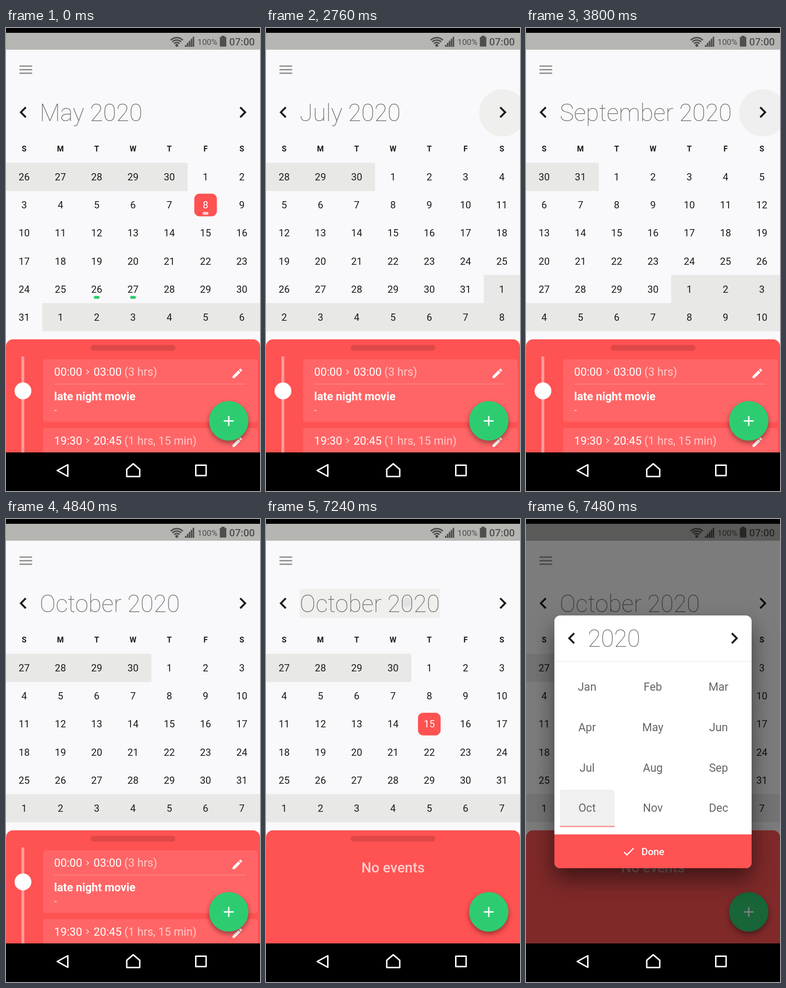
Animation, 528 px wide and 960 px high, one loop 8000 ms. Source, as an HTML page with a canvas:

```html
<!DOCTYPE html>
<html lang="en">
<head>
<meta charset="utf-8">
<title>Calendar</title>
<style>
  html, body { margin: 0; width: 100%; height: 100%; overflow: hidden; background: #000; }
  canvas { display: block; }
</style>
</head>
<body>
<canvas id="stage" width="528" height="960"></canvas>
<script>
const ctx = document.getElementById('stage').getContext('2d');
const LOOP = 8000, COL = 528 / 7, ROW = 58.13, GRID_TOP = 279.5, NAV_TOP = 880, TITLE_SIZE = 49.87;
const PAPER = '#f9f9fb', RED = '#ff5252', GREEN = '#2ecc71', INK = '#1c1c1c', WHITE = '#fff',
      PINK = '#ffcbcb', PRESSED = '#efefee', OUTSIDE = '#e8e8e7', MUTED = '#666';

// 24-unit icons
const ICON = {
  left: new Path2D('M15.41 7.41L14 6l-6 6 6 6 1.41-1.41L10.83 12z'),
  right: new Path2D('M10 6L8.59 7.41 13.17 12l-4.58 4.59L10 18l6-6z'),
  pencil: new Path2D('M3 17.25V21h3.75L17.81 9.94l-3.75-3.75zM20.71 7.04a1 1 0 0 0 0-1.41l-2.34-2.34a1 1 0 0 0-1.41 0l-1.83 1.83 3.75 3.75z'),
  check: new Path2D('M9 16.17L4.83 12l-1.42 1.41L9 19 21 7l-1.41-1.41z'),
};

// Each press highlights from start to end and takes effect on release
const tap = (start, end, day) => ({ start, end, day, release: Math.max(start + 40, end - 240) });
const nextTaps = [tap(2160, 2440), tap(2680, 2960), tap(3240, 3600), tap(3760, 4000), tap(4200, 4600)];
const dayTaps = [tap(5120, 5360, 14), tap(6000, 6800, 15)];
const titleTap = tap(7040, 7440);

const clamp = v => Math.max(0, Math.min(1, v));
const press = (t, { start, end }) => clamp(Math.min((t - start + 30) / 80, (end - t) / 160));

function box(x, y, w, h, color, radius = 0) {
  ctx.fillStyle = color;
  ctx.beginPath();
  ctx.roundRect(x, y, w, h, radius);
  ctx.fill();
}

function disc(x, y, r, color) {
  ctx.fillStyle = color;
  ctx.beginPath();
  ctx.arc(x, y, r, 0, 2 * Math.PI);
  ctx.fill();
}

function text(str, x, y, size, color, weight = 400, align = 'left') {
  ctx.font = `${weight} ${size}px Roboto, sans-serif`;
  ctx.textAlign = align;
  ctx.fillStyle = color;
  ctx.fillText(str, x, y);
}

function icon(name, x, y, scale, color) {
  ctx.save();
  ctx.translate(x, y);
  ctx.scale(scale, scale);
  ctx.fillStyle = color;
  ctx.fill(ICON[name]);
  ctx.restore();
}

function withAlpha(alpha, draw) {
  if (alpha <= 0) return;
  ctx.save();
  ctx.globalAlpha = alpha;
  draw();
  ctx.restore();
}

function withShadow(color, blur, offset, draw) {
  ctx.save();
  Object.assign(ctx, { shadowColor: color, shadowBlur: blur, shadowOffsetY: offset });
  draw();
  ctx.restore();
}

function outline(d, color, width) {
  ctx.strokeStyle = color;
  ctx.lineWidth = width;
  ctx.lineJoin = 'round';
  ctx.stroke(new Path2D(d));
}

function statusBar() {
  const ink = '#4e4e4c';
  box(0, 10, 528, 35, '#b5b5b2');
  ctx.strokeStyle = ink;
  ctx.lineWidth = 3;
  for (const r of [8, 13, 18]) {
    ctx.beginPath();
    ctx.arc(355, 38, r, -Math.PI * 0.75, -Math.PI * 0.25);
    ctx.stroke();
  }
  disc(355, 36, 3, ink);
  for (let i = 0; i < 5; i++) box(372 + i * 4, 35 - i * 4.2, 3.2, 4 + i * 4.2, ink);
  text('100%', 398, 34.5, 17.2, ink);
  box(444.5, 18.5, 13.5, 20, ink, 1);
  box(448, 16, 6.5, 3, ink);
  text('07:00', 464, 36, 21, ink, 500);
}

function navBar() {
  box(0, NAV_TOP, 528, 80, '#000');
  outline('M106.5 917.5L128.5 905.5V929.5Z', WHITE, 3);
  outline('M251 930V915L264.5 903.5L278 915V930Z', WHITE, 3);
  outline('M394.5 906.5H416V928H394.5Z', WHITE, 3);
}

function header(t, month) {
  for (const y of [79, 86.4, 93.8]) box(28, y - 1.4, 26.4, 2.8, '#8f8f8f');

  for (const next of nextTaps)
    withAlpha(press(t, next), () => disc(492, 176, 49, PRESSED));

  const name = new Date(2020, month, 1).toLocaleString('en-US', { month: 'long' });
  const title = name + ' 2020';
  withAlpha(press(t, titleTap), () => {
    ctx.font = `100 ${TITLE_SIZE}px Roboto, sans-serif`;
    box(70, 145, ctx.measureText(title).width, 60, PRESSED);
    disc(293, 173, 10 * clamp((t - 7160) / 80), '#e2e2e2');
  });
  text(title, 70, 192.5, TITLE_SIZE, MUTED, 100);

  icon('left', 12.4, 151.2, 1.955, INK);
  icon('right', 468.7, 151.2, 1.955, INK);
  [...'SMTWTFS'].forEach((d, i) => text(d, (i + 0.5) * COL, 256, 16.1, INK, 700, 'center'));
}

function monthGrid(t, month, selected) {
  const offset = new Date(2020, month, 1).getDay();
  for (let i = 0; i < 42; i++) {
    const date = new Date(2020, month, 1 - offset + i), day = date.getDate();
    const inMonth = date.getMonth() === month;
    const x = i % 7 * COL, y = GRID_TOP + Math.floor(i / 7) * ROW;
    const cx = x + COL / 2, cy = y + ROW / 2 + 0.3;
    const isSelected = inMonth && day === selected;

    if (!inMonth) box(x, y, COL + 0.4, ROW + 0.4, OUTSIDE);
    if (inMonth && month === 9) {
      for (const pressed of dayTaps)
        if (pressed.day === day)
          withAlpha(press(t, pressed), () => box(x, y, COL, ROW, PRESSED));
    }
    if (isSelected) box(cx - 23.5, cy - 23.5, 47, 47, RED, 11);
    if (inMonth && month === 4 && [8, 26, 27].includes(day))
      box(cx - 6, cy + 14.2, 12, 6, isSelected ? PINK : GREEN, 3);
    text(day, cx, cy + 7.3, 20.5, isSelected ? WHITE : INK, 400, 'center');
  }
}

function eventCard(y, from, to, duration, name) {
  box(77, y, 446, 130, '#ff6566', 5);
  text(from, 100, y + 34, 23.47, WHITE);
  outline(`M167 ${y + 21.5}l5 4.5l-5 4.5`, PINK, 1.8);
  text(to, 182, y + 34, 23.47, WHITE);
  text(duration, 246, y + 34, 23.47, PINK);
  icon('pencil', 467.7, y + 16, 1.1, WHITE);
  box(100, y + 50.5, 398, 1.5, '#ff8686');
  text(name, 100, y + 85, 23.47, WHITE, 700);
  text('-', 100, y + 112, 20.5, '#ffe0e0');
}

function sheet(hasEvents) {
  box(0, 645.5, 528, 240, RED, [14.67, 14.67, 0, 0]);
  box(176, 657, 176, 12, '#e04848', 6);
  if (hasEvents) {
    box(32, 681, 6, 200, '#ff9a9a');
    disc(35.3, 752.5, 17.5, WHITE);
    eventCard(687, '00:00', '03:00', '(3 hrs)', 'late night movie');
    eventCard(829.5, '19:30', '20:45', '(1 hrs, 15 min)', '');
  } else {
    text('No events', 264, 732.5, 29.33, PINK, 500, 'center');
  }
  withShadow('rgba(0,0,0,.4)', 11, 5, () => disc(463, 814.5, 41, GREEN));
  box(452.7, 813.3, 20.6, 2.9, WHITE);
  box(461.6, 804.4, 2.9, 20.6, WHITE);
}

function monthPicker() {
  box(0, 10, 528, 870, 'rgba(0,0,0,.5)');
  withShadow('rgba(0,0,0,.5)', 45, 22, () => box(59, 200, 410, 524, WHITE, 12));
  icon('left', 71.4, 223.8, 1.955, INK);
  icon('right', 409.7, 223.8, 1.955, INK);
  text('2020', 128.5, 265, TITLE_SIZE, MUTED, 100);
  box(59, 294.5, 410, 1.5, '#ececec');
  box(70.5, 561, 113.5, 78, '#f0f0f0', [5, 5, 0, 0]);
  box(70.5, 636, 113.5, 3, '#ff9c9c');
  'Jan Feb Mar Apr May Jun Jul Aug Sep Oct Nov Dec'.split(' ').forEach((name, i) =>
    text(name, 127 + i % 3 * 136.6, 356.3 + Math.floor(i / 3) * 83.7, 23.47, MUTED, 400, 'center'));
  box(59, 654, 410, 70, RED, [0, 0, 12, 12]);
  icon('check', 198.8, 675, 1.222, WHITE);
  text('Done', 240, 697, 20.5, WHITE, 500);
}

function render(t) {
  const month = 4 + nextTaps.filter(({ release }) => t >= release).length;
  const picked = dayTaps.filter(({ release }) => t >= release).pop();
  const selected = picked ? picked.day : month === 4 ? 8 : 0;

  box(0, 0, 528, 960, '#000');
  box(0, 45, 528, 835, PAPER);
  statusBar();
  header(t, month);
  monthGrid(t, month, selected);
  sheet(!picked);
  withAlpha(clamp((t - 7250) / 220), monthPicker);
  navBar();
}

const begin = performance.now();
function tick() {
  render((performance.now() - begin) % LOOP);
  requestAnimationFrame(tick);
}
tick();
</script>
</body>
</html>
```
